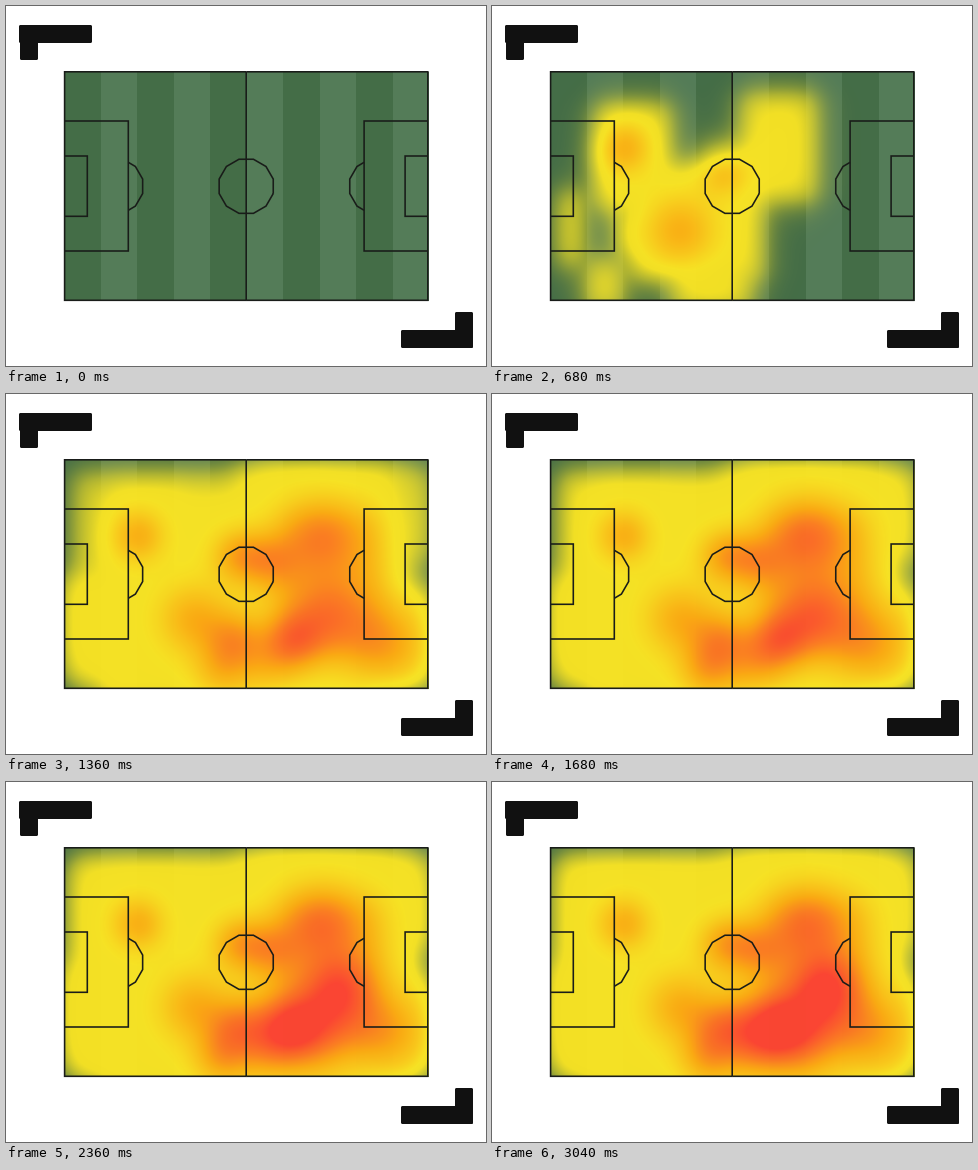
Animation, 480 px wide and 360 px high, one loop 5000 ms. Source, as a matplotlib script:

```python
import numpy as np
import matplotlib.pyplot as plt
from matplotlib.animation import FuncAnimation
from matplotlib.patches import Rectangle, FancyBboxPatch

W, H, DPI = 480, 360, 100
STEP, FRAMES = 40, 125           # ms per frame, frames per loop
LAST_STAGE = 9                   # three stages a second, then a hold
LEFT, TOP, RIGHT, BOTTOM = 58, 66, 423, 295
MID_X, MID_Y = 240.2, 180.3
INK = "#191c19"

gx, gy = np.meshgrid(np.arange(LEFT, RIGHT) + .5, np.arange(TOP, BOTTOM) + .5)


def zone(x0, x1, y0, y1, edge=8):
    """Rectangle of level 1 with soft edges."""
    def span(v, lo, hi):
        return 1 / ((1 + np.exp((lo - v) / edge)) * (1 + np.exp((v - hi) / edge)))
    return span(gx, x0, x1) * span(gy, y0, y1)


def spot(x, y, spread):
    return .8 * np.exp(-((gx - x) ** 2 + (gy - y) ** 2) / (2 * spread ** 2))


class Wave:
    """Zones covered and hot spots added between two stages."""

    def __init__(self, start, end, zones, heat=0):
        self.start, self.end = start, end
        self.bare = np.prod([1 - z for z in zones], axis=0)
        self.heat = heat

    def strength(self, stage):
        left = np.clip((self.end - stage) / (self.end - self.start), 0, 1)
        return 1 - left ** 2


def build_waves():
    opening = Wave(0, 1, [zone(127, 180, 207, 250), zone(116, 138, 140, 205)])
    build_up = Wave(
        1, 2,
        [zone(105, 178, 98, 200), zone(140, 270, 160, 272),
         zone(182, 258, 260, 305), zone(250, 324, 88, 195),
         zone(68, 90, 185, 260), zone(95, 130, 255, 305)],
        spot(132, 142, 19) + spot(188, 225, 25) + spot(232, 162, 19))
    pressure = Wave(
        2, 3,
        [zone(105, 365, 100, 305), zone(230, 386, 76, 230),
         zone(300, 425, 195, 290), zone(60, 150, 185, 284)],
        .9 * zone(272, 376, 118, 265, 12) + spot(262, 168, 20)
        + spot(288, 245, 20) + spot(228, 245, 20) + spot(385, 250, 30))
    siege = Wave(
        3, 5,
        [zone(68, 408, 79, 292), zone(250, 424, 76, 165)],
        spot(315, 140, 27) + spot(322, 222, 25)
        + spot(262, 266, 24) + spot(215, 276, 20))
    peak = Wave(
        5, 9, [zone(68, 408, 79, 292)],
        spot(338, 200, 22) + spot(262, 240, 24) + spot(310, 268, 26))
    return [opening, build_up, pressure, siege, peak]


def heat_at(stage, waves):
    """Level 1 is solid yellow, 2 orange, 3 red."""
    bare, hot = 1, np.zeros(gx.shape)
    for wave in waves:
        k = wave.strength(stage)
        bare = bare * (1 - k + k * wave.bare)
        hot = hot + k * wave.heat
    return 1 - bare + hot


def colorize(field):
    stops = [1.1, 1.9, 2.4, 3.1]
    channels = [(252, 255, 255, 255), (230, 172, 124, 68), (35, 18, 34, 50)]
    rgba = np.empty(field.shape + (4,))
    for i, channel in enumerate(channels):
        rgba[..., i] = np.interp(field, stops, channel) / 255
    rgba[..., 3] = np.interp(field, [0, .5, .9, 1.2], [0, .57, .95, .98])
    return rgba


fig = plt.figure(figsize=(W / DPI, H / DPI), dpi=DPI, facecolor="white")
ax = fig.add_axes([0, 0, 1, 1])
ax.axis("off")


def line(xs, ys):
    ax.plot(xs, ys, color=INK, lw=1.6 * 72 / DPI, solid_joinstyle="miter",
            solid_capstyle="butt", snap=False, zorder=3)


def draw_grass():
    width = (RIGHT - LEFT) / 10
    for i in range(10):
        color = "#547c58" if i % 2 else "#446d47"
        ax.add_patch(Rectangle((LEFT + i * width, TOP), width, BOTTOM - TOP,
                               fc=color, lw=0, antialiased=False, zorder=1))


def draw_lines():
    x0, y0, y1 = LEFT + .6, TOP - .2, BOTTOM - .7
    box_x, goal_x = 122.3, 81.3
    line([MID_X, MID_X], [y0, y1])
    angles = np.radians(np.arange(15, 376, 30))
    line(MID_X + 28 * np.cos(angles), MID_Y + 28 * np.sin(angles))

    arc = np.radians([-45, -15, 15, 45])
    arc_x = np.r_[box_x, 109.6 + 28 * np.cos(arc), box_x]
    arc_y = MID_Y + np.r_[-24, 28 * np.sin(arc), 24]
    for side in (1, -1):
        def flip(xs):
            return MID_X + side * (np.asarray(xs) - MID_X)
        line(flip([MID_X, x0, x0, MID_X]), [y0, y0, y1, y1])
        line(flip([x0, box_x, box_x, x0]), [115, 115, 245, 245])
        line(flip([x0, goal_x, goal_x, x0]), [150, 150, 210.3, 210.3])
        line(flip(arc_x), arc_y)


def bar(x0, y0, x1, y1):
    ax.add_patch(FancyBboxPatch((x0, y0), x1 - x0, y1 - y0, fc="#111111", lw=0,
                                boxstyle="round,pad=0,rounding_size=1.5"))


draw_grass()
draw_lines()
bar(13, 19, 86, 37)
bar(14, 19, 32, 54)
bar(395, 324, 467, 342)
bar(449, 306, 467, 342)

waves = build_waves()
stages = [colorize(heat_at(s, waves)) for s in range(LAST_STAGE + 1)]
heat = ax.imshow(stages[0], extent=(LEFT, RIGHT, BOTTOM, TOP), aspect="auto",
                 interpolation="nearest", zorder=2)
ax.set_xlim(0, W)
ax.set_ylim(H, 0)


def update(frame):
    heat.set_data(stages[min(frame * STEP * 3 // 1000, LAST_STAGE)])
    return [heat]


anim = FuncAnimation(fig, update, frames=FRAMES, interval=STEP, repeat=True,
                     repeat_delay=0, blit=False)
plt.show()
```
